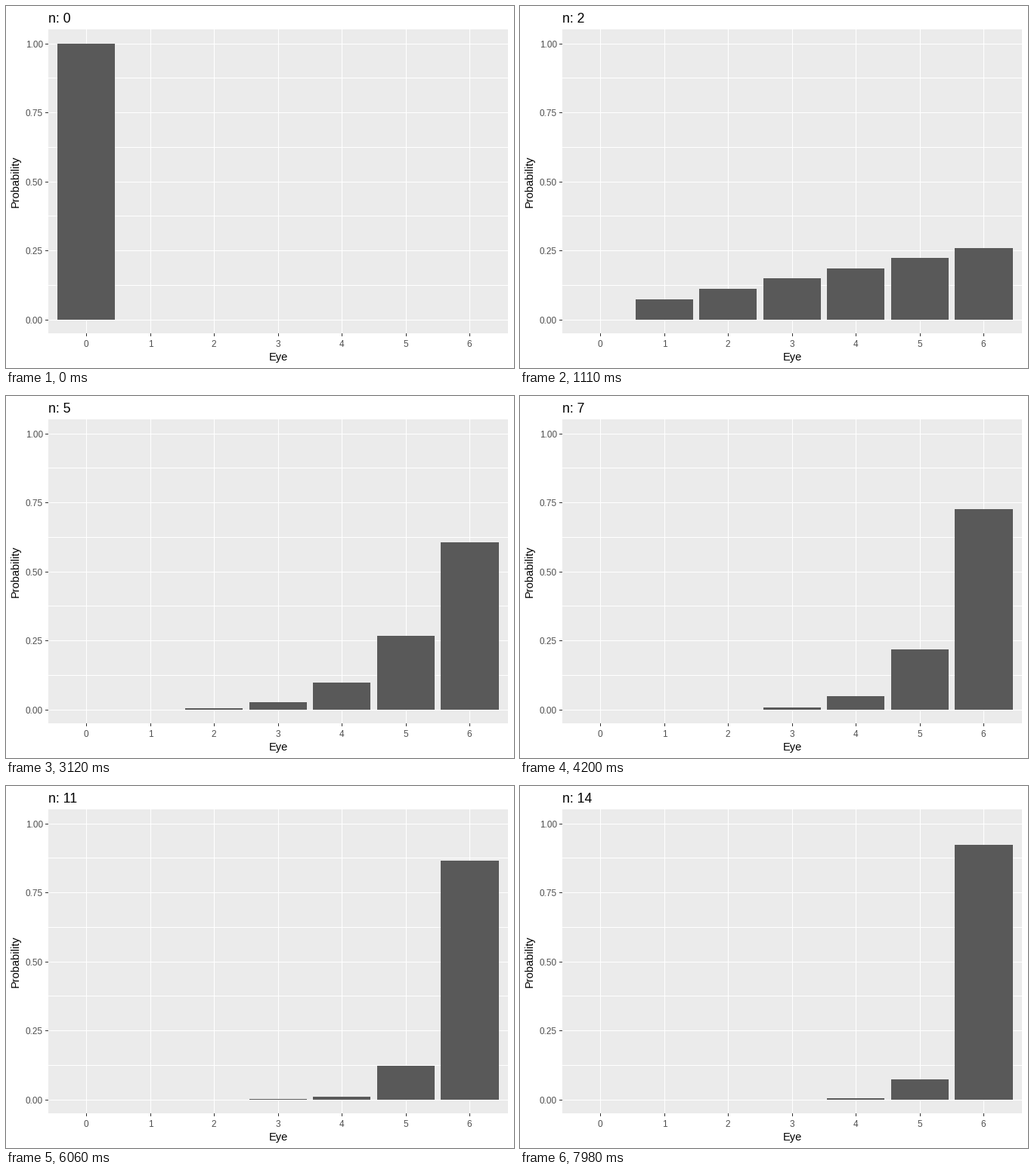
A matplotlib script that plays this animation: 672 px wide and 480 px high, repeating every 8 s.

```python
import math

import matplotlib.pyplot as plt
from matplotlib.animation import FuncAnimation
from matplotlib.collections import PolyCollection
from matplotlib.patches import Rectangle
from matplotlib.transforms import Affine2D

W, H, DPI = 672, 480, 96
LOOP, TICK = 8000, 10               # ms
FIRST, CYCLE, STEP, STEPS = 420, 540, 30, 9

X0, DX = 106.24, 84.54              # category 0 and category spacing
Y0, DY = 415.67, 365.92             # probability 0 and height of probability 1
BAR = 0.45 * DX

plt.rcParams["font.family"] = "Liberation Sans"
fig = plt.figure(figsize=(W / DPI, H / DPI), dpi=DPI, facecolor="white")
px = Affine2D().scale(1 / W, -1 / H).translate(0, 1) + fig.transFigure


def snap(v):
    return math.floor(v + 0.5)


def xpos(k):
    return X0 + DX * k


def ypos(p):
    return Y0 - DY * p


def boxes(rects, color, z):
    polys = [[(l, t), (r, t), (r, b), (l, b)] for l, t, r, b in rects]
    fig.add_artist(PolyCollection(polys, facecolors=color, edgecolors="none",
                                  linewidths=0, antialiaseds=False,
                                  transform=px, zorder=z))


def label(x, y, s, size, color="black", ha="center", **kw):
    return fig.text(x, y, s, fontsize=size, color=color, ha=ha,
                    va="baseline", transform=px, zorder=5, **kw)


# Panel, grid, ticks and labels
left, right = snap(xpos(-0.6)), snap(xpos(6.6))
top, bottom = snap(ypos(1.05)), snap(ypos(-0.05))
rows = [snap(ypos(i / 8)) for i in range(9)]
cols = [snap(xpos(k) - 0.01) for k in range(7)]

boxes([(left, top, right, bottom)], "#EBEBEB", 1)
boxes([(left, y, right, y + 1) for y in rows]
      + [(x, top, x + 1, bottom) for x in cols], "white", 2)
boxes([(left - 4, y, left, y + 1) for y in rows[::2]]
      + [(x, bottom, x + 1, bottom + 4) for x in cols], "#333333", 2)

for i, y in enumerate(rows[::2]):
    label(49, y + 5, f"{i / 4:.2f}", 8.8, "#4D4D4D", "right")
for k, x in enumerate(cols):
    label(x, 452, str(k), 8.8, "#4D4D4D")
label(360, 470, "Eye", 11)
label(20, 233, "Probability", 11, ha="right", rotation=90,
      rotation_mode="default").set(va="center")

title = label(56, 22, "", 13.2, ha="left")
base = snap(Y0)
bars = []
for k in range(7):
    l, r = snap(xpos(k) - BAR), snap(xpos(k) + BAR)
    bars.append(fig.add_artist(Rectangle(
        (l, base), r - l, 0, facecolor="#595959", linewidth=0,
        antialiased=False, transform=px, zorder=3)))


def prob(k, n):
    """Chance that the highest of n dice shows k."""
    if k == 0:
        return 0.0 ** n
    return (k / 6) ** n - ((k - 1) / 6) ** n


def update(i):
    n, step = 0, 0
    t = i * TICK - FIRST
    if t >= 0:
        n, rest = divmod(t, CYCLE)
        step = min(rest // STEP + 1, STEPS)
    u = step / STEPS
    for k, bar in enumerate(bars):
        p = (1 - u) * prob(k, n) + u * prob(k, n + 1)
        y = snap(ypos(p))
        bar.set_y(y)
        bar.set_height(base - y)
    title.set_text(f"n: {n + (step > 5)}")
    return bars + [title]


anim = FuncAnimation(fig, update, frames=LOOP // TICK, interval=TICK,
                     repeat=True, repeat_delay=0, blit=False)
plt.show()
```
